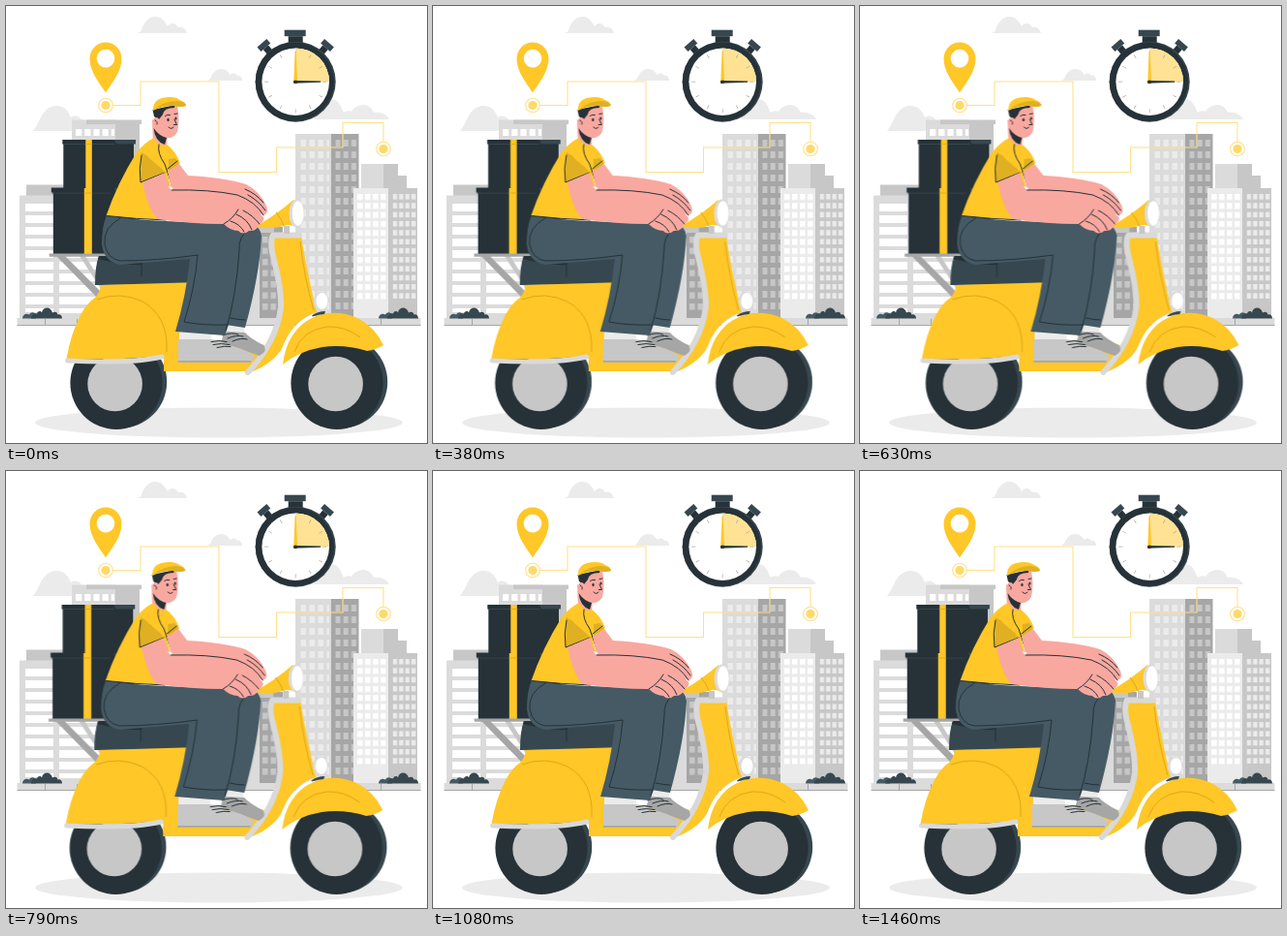
Animation of 435x451 px, one loop 1.5 s. Source, as an HTML page:

```html
<!DOCTYPE html>
<html lang="en">
<head>
<meta charset="utf-8">
<title>Scooter delivery</title>
<style>
  html, body { margin: 0; width: 100%; height: 100%; overflow: hidden; background: #fff; }
  svg { display: block; width: 100%; height: 100%; }
  .rider { animation: shake 1.5s ease-out infinite; }
  @keyframes shake {
    0%, 100% { transform: translateX(0); }
    10%, 90% { transform: translateX(-.98px); }
    20%, 80% { transform: translateX(1.96px); }
    30%, 50%, 70% { transform: translateX(-3.92px); }
    40%, 60% { transform: translateX(3.92px); }
  }
  .yellow { fill: #ffc727; }
  .gold { fill: #e0b022; }
  .ink { fill: #263238; }
  .slate { fill: #37474f; }
  .denim { fill: #455a64; }
  .skin { fill: #f9a8a0; }
  .g1 { fill: #ebebeb; }
  .g2 { fill: #dbdbdb; }
  .g3 { fill: #c7c7c7; }
  .g4 { fill: #a6a6a6; }
  .white { fill: #fff; }
  .line { fill: none; stroke: #263238; stroke-width: 1; stroke-linecap: round; stroke-linejoin: round; }
  .seam { fill: none; stroke: #dba91c; stroke-width: 1; }
  .trim { fill: none; stroke: #d9d9d9; stroke-width: 6; stroke-linecap: round; stroke-linejoin: round; }
  .route { fill: none; stroke: #ffe08a; stroke-width: 1.1; }
</style>
</head>
<body>
<svg viewBox="0 0 435 451">
  <defs>
    <pattern id="tall" x="303" y="138" width="9" height="12" patternUnits="userSpaceOnUse">
      <rect class="g1" x="1.5" width="5.5" height="7"/>
    </pattern>
    <pattern id="tallSide" x="339" y="138" width="8.2" height="12" patternUnits="userSpaceOnUse">
      <rect class="g3" x="1.5" width="5" height="7"/>
    </pattern>
    <pattern id="low" x="362" y="194" width="8" height="9.3" patternUnits="userSpaceOnUse">
      <rect class="white" x="1" width="5.6" height="6"/>
    </pattern>
    <pattern id="lowSide" x="399" y="194" width="6.4" height="9.3" patternUnits="userSpaceOnUse">
      <rect class="g1" x=".8" width="4.3" height="5.6"/>
    </pattern>
    <pattern id="mid" x="264" y="238" width="8.5" height="11.5" patternUnits="userSpaceOnUse">
      <rect class="g3" x="1" width="5.5" height="6.5"/>
    </pattern>
    <pattern id="floors" x="0" y="204" width="100" height="12" patternUnits="userSpaceOnUse">
      <rect class="white" width="100" height="8"/>
    </pattern>
    <pattern id="attic" x="72" y="127" width="9.2" height="13" patternUnits="userSpaceOnUse">
      <rect class="white" width="6.2" height="7"/>
    </pattern>
    <g id="wheel">
      <circle class="slate" cx="3.5" cy="-1" r="47.5"/>
      <ellipse class="ink" cx="-1.2" cy="0" rx="47.6" ry="48"/>
      <circle class="g3" cx="-2.6" cy="1" r="28.3"/>
    </g>
    <g id="bush">
      <path class="denim" d="M0 11c0-4 4-6 7-4c2-4 7-2 7 1v3z"/>
      <path class="slate" d="M9 11c0-4 4-6 6-5c1-3 4-3 5-1c1-6 9-7 11 0c3-2 6 0 5 2c3-1 5 1 5 4z"/>
    </g>
    <g id="stop">
      <circle class="white" r="7.3" stroke="#ffe08a" stroke-width="1.1"/>
      <circle r="4.6" fill="#ffd968"/>
    </g>
    <g id="button">
      <rect class="slate" x="-6.5" y="-53" width="13" height="6"/>
      <rect class="ink" x="-3.5" y="-47" width="7" height="8"/>
    </g>
  </defs>

  <!-- sky -->
  <g class="g1">
    <path d="M135 28c3-1 4-1 5-3c2-8 8-14 14-14c7 0 10 5 13 10c4-5 8-3 11 1c5-1 8 2 9 6z"/>
    <path d="M208 77c2-1 3-2 4-4c2-5 6-8 10-8c6 0 7 3 10 6c3-3 6-1 7 1c3-1 5 2 5 5z"/>
    <path d="M28 129c2-3 4-6 6-10c4-9 9-16 18-16c9 0 12 5 15 12c4-3 9-1 12 3c6-1 11 4 12 11z"/>
    <path d="M318 117c0-11 8-21 17-21c9 0 11 8 14 14c3-2 6-2 8-1c3-5 8-7 13-7c6 1 8 4 10 8c8-1 14 3 16 7z"/>
  </g>

  <!-- left buildings -->
  <path class="g3" d="M21 184.500h45v12H21z"/>
  <path class="g2" d="M14 195.500h38V322H14z"/>
  <path fill="url(#floors)" d="M20 203h29v113H20z"/>
  <path class="g2" d="M68 117.500h45V322H68z"/>
  <path class="g3" d="M83 117.500h57v4.500H83zM113 122h25v200h-25z"/>
  <path fill="url(#attic)" d="M72 127h40v8H72z"/>
  <path class="g2" d="M52 250h58v72H52z"/>
  <path fill="url(#floors)" d="M55 256h50v61H55z"/>

  <!-- right buildings -->
  <path class="g2" d="M235 228h27v94h-27z"/>
  <path class="g4" d="M262 228h24v94h-24z"/>
  <path fill="url(#mid)" d="M264 238h20v80h-20z"/>
  <path class="g2" d="M299 132h37v190h-37z"/>
  <path class="g4" d="M336 132h28.500v190H336z"/>
  <path fill="url(#tall)" d="M303 138h31v180h-31z"/>
  <path fill="url(#tallSide)" d="M339 138h25v180h-25z"/>
  <path class="g2" d="M367 163h23v25h-23z"/>
  <path class="g3" d="M390 163h15v25h-15zM405 175h9v13h-9z"/>
  <path class="g1" d="M359 188h36v134h-36z"/>
  <path class="g3" d="M395 188h30v134h-30z"/>
  <path fill="url(#low)" d="M362 194h32v110h-32z"/>
  <path fill="url(#lowSide)" d="M399 194h25v110h-25z"/>

  <!-- street -->
  <path class="g2" d="M11.500 322H428.500v7.500H11.500z"/>
  <path d="M11.500 329.500H428.500M40.500 323v6M73.500 323v6M387.500 323v6" stroke="#a6a6a6" fill="none"/>
  <use href="#bush" x="17" y="311.500"/>
  <use href="#bush" x="385" y="311.500"/>

  <!-- route -->
  <path class="route" d="M110 102.500H139V78H220V171.500H279.500V146H348V120.500H390V140"/>
  <use href="#stop" x="103" y="102.500"/>
  <use href="#stop" x="390" y="147.500"/>
  <path class="yellow" fill-rule="evenodd" d="M103 89.500C97 80 86.500 68 86.500 54.500a16.500 17 0 0 1 33 0C119.500 68 109 80 103 89.500zM103 44.800a9.300 9.300 0 1 0 .01 0z"/>

  <!-- stopwatch -->
  <g transform="translate(299.200 78.200)">
    <path class="slate" d="M-11.500-53.500h22v6.500h-22z"/>
    <path class="ink" d="M-7.500-47h15v8h-15z"/>
    <use href="#button" transform="rotate(-41)"/>
    <use href="#button" transform="rotate(41)"/>
    <circle class="slate" r="41.500"/>
    <circle class="ink" cx="-.8" r="40.700"/>
    <circle class="white" r="34.800"/>
    <path d="M0 0V-34.800A34.800 34.800 0 0 1 34.800 0z" fill="#ffe294"/>
    <circle r="30" fill="none" stroke="#a6a6a6" stroke-width="4" pathLength="120" stroke-dasharray=".45 9.550" stroke-dashoffset=".22"/>
    <path class="yellow" d="M-2 2L-.6-31h1.200L2 2z"/>
    <path class="ink" d="M-2-1.300L26-.7v1.200L-2 1.500z"/>
    <circle class="ink" r="1.800"/>
  </g>

  <ellipse class="g1" cx="220" cy="430" rx="190" ry="15.500"/>

  <g class="rider">
    <!-- parcels -->
    <path class="g4" d="M52 258h9l39 39v10z"/>
    <path class="g3" d="M76 258h6l18 29v8z"/>
    <path class="ink" d="M48.800 188H134v68H48.800z"/>
    <path class="ink" d="M59.300 138H132v50H59.300z"/>
    <path class="slate" d="M112 138h22v4.500h-20zM112 188h22v5h-20z"/>
    <path class="line" style="stroke:#37474f" d="M59 142.500h53M48 193h60"/>
    <path class="ink" d="M58.300 138h54v4h-54zM46.800 187.500H108v5H46.800z"/>
    <path class="yellow" d="M82.300 138h6.500v50h-6.500zM80.800 188h8v68h-8z"/>
    <path class="gold" d="M82.300 142h6.500v1h-6.500zM80.800 192.500h8v1h-8z"/>
    <path class="g4" d="M44.700 255.500H108v3.300H44.700z"/>

    <!-- scooter -->
    <use href="#wheel" x="115.200" y="389"/>
    <use href="#wheel" x="343.200" y="389"/>
    <path class="slate" d="M96 258H194L187 287L92 288Q92 268 96 258z"/>
    <path class="ink" d="M96 258h20q6 7 25 7v2q-20 1-46-6z"/>
    <path class="line" d="M140 267v12"/>
    <path class="yellow" d="M98 288L200 285V345H236L268 350L253 377H163V361Q112 366 62.500 364Q67 338 77 319Q84 306 92 301Q98 294 98 288z"/>
    <path class="seam" d="M94 303Q118 294 141 305Q168 320 166 357"/>
    <path d="M63.500 366Q128 369.500 161 362" fill="none" stroke="#d9d9d9" stroke-width="5" stroke-linecap="round"/>
    <path class="yellow" d="M275 237H305Q310 270 321 316Q300 322 289 345Q281 368 250 379Q281 346 284 310Q279 275 275 237z"/>
    <path class="seam" d="M304 243Q308 280 318 314"/>
    <path class="trim" d="M303 236.500H276Q273 242 275 254Q285 292 284 311Q280 346 250 378"/>
    <path class="yellow" d="M286 370Q290 335 317 321Q340 312 363 322Q381 331 390 350Q382 355 373 356Q350 349 327 352Q303 356 286 370z"/>
    <path d="M283 370Q289 331 319 319" fill="none" stroke="#fff" stroke-width="3.500"/>
    <path class="seam" d="M298 357Q306 334 332 331Q350 330 366 342"/>
    <path class="slate" d="M316 319.500Q322 315 330 315l-1 3q-6 0-12 2.500z"/>
    <ellipse class="g2" cx="325.500" cy="304.500" rx="7.800" ry="10"/>
    <ellipse class="white" cx="326.500" cy="304.500" rx="6" ry="8.500"/>
    <path class="g3" d="M260 228h17v6h-17zM287 227h6v8h-6z"/>
    <path class="yellow" d="M257 228Q280 215 297 200L302 229Q294 224 287 227Q275 231 257 228z"/>
    <path class="seam" d="M279 213Q285 220 287 227"/>
    <ellipse class="g2" cx="300.500" cy="214" rx="8" ry="14.500"/>
    <ellipse class="white" cx="301.700" cy="214" rx="6" ry="12.800"/>

    <!-- legs -->
    <path class="g1" d="M179 334H212V346H179zM226 328h20v11h-20z"/>
    <path class="g4" d="M226 336L247 337Q252 343 266 350Q271 356 262 361L222 347z"/>
    <path class="g3" d="M178 344H210Q220 344 229 350Q245 353 257 361L254 367.500H178z"/>
    <path class="g4" d="M178 366h75v1.800h-75z"/>
    <path class="line" d="M212 346.500q8-2 16 0M214 349.500q8-2 17 0M218 352.500q8-2 14-1M224 340q9-4 16-1M229 343q9-4 16-2M234 346q9-4 15-2"/>
    <path class="denim" d="M238 222Q262 222 264 237Q262 278 247 332L227 329Q240 290 235 240z"/>
    <path class="denim" d="M104 216Q145 224 238 223Q252 226 251 243Q245 292 226 340L175 336Q186 300 190 261L118 267Q101 264 99 246Q99 227 104 216z"/>
    <path class="line" d="M118 219Q100 229 102 246Q105 261 118 263Q155 263 198 257Q195 292 184 326Q205 330 229 329M251 230Q240 238 241 252Q238 300 227 335M232 322Q240 324 247 324"/>

    <!-- torso -->
    <path class="skin" d="M151 117L167 132L166 145L152 142z"/>
    <path class="yellow" d="M153 136Q158 146 166 143Q175 149 180 162L167 174L171 190L166 221Q135 220 103.500 216.500Q115 183 135 151Q143 141 153 136z"/>
    <path class="gold" d="M140 151L155 160L164 172L139 182.500z"/>
    <path class="yellow" d="M141 147Q155 150 161 168L148 157z"/>
    <path class="gold" d="M168 158L175 157L179 163L168 170z"/>
    <path class="line" d="M140 154Q137 168 139 182L164 172M158 143Q156 152 164 163L173 190M177 160L167 168M104 216.500Q135 220 165 221"/>

    <!-- head -->
    <path class="skin" d="M155 107L177 103Q180 118 177 130Q173 137 166 136Q157 132 153 121z"/>
    <path class="ink" d="M151.500 107L175 102L174 105Q163 105 162 112L158 117L153 114z"/>
    <path class="ink" d="M152.500 126Q158 134 166 136L164 143Q154 140 152.500 126z"/>
    <ellipse class="skin" cx="155.300" cy="120" rx="3.600" ry="5"/>
    <path class="line" d="M154 118q3 1 2 4M174 117l2.500 5.500h-3M168 125q3 3 5 0M164.500 113.500q2-2 5-1M174 111.500l3-.5"/>
    <ellipse class="ink" cx="167.500" cy="117.500" rx="1.100" ry="1.700"/>
    <ellipse class="ink" cx="175.500" cy="116" rx="1" ry="1.600"/>
    <path class="yellow" d="M152 108Q151 98 161 95Q174 92 180 97Q186 99 186 103Q180 105 173 103Q161 103 152 108z"/>
    <path class="gold" d="M153 107Q163 98 177 98Q186 99 186 103Q180 105 173 103Q161 103 153 107z"/>

    <!-- arms -->
    <path class="skin" d="M167 171L179 163L188 175Q225 177 248 184Q262 191 269 206Q272 214 266 216L250 207L172 193z"/>
    <path class="skin" d="M141 182L164 172Q167 184 171 190Q207 189 240 196Q259 205 264 216Q270 220 262 225Q259 233 251 232Q245 237 240 232Q232 232 225 225Q190 225 157 220Q147 211 141 182z"/>
    <path class="white" d="M167.500 186l5 1.500-1.500 3z"/>
    <path class="line" d="M171 190Q210 189 239 195Q258 202 266 216M247 189Q259 194 266 203M250 195Q261 201 268 211M225 225Q235 219 240 210M232 222q10 3 14 11M238 215q12 5 16 16M245 211q10 5 17 14"/>
  </g>
</svg>
</body>
</html>
```
